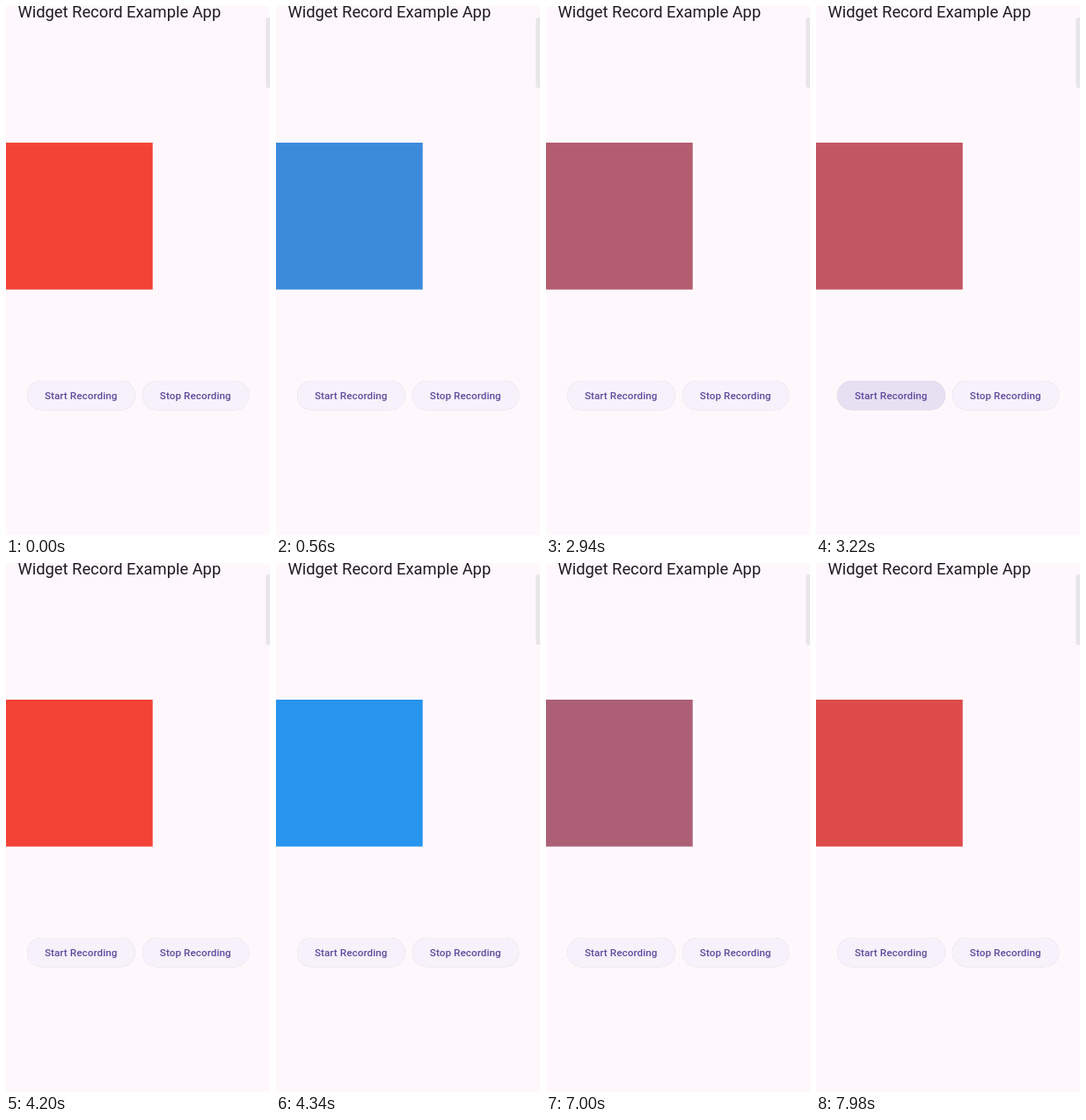
These frames come from a looping animation (300 px wide and 600 px high, 8000 ms). An HTML page:

```html
<!DOCTYPE html>
<html lang="en">
<head>
<meta charset="utf-8">
<title>Widget recorder</title>
<style>
  html, body { margin: 0; width: 100%; height: 100%; overflow: hidden; background: #fef8fd; }
  svg { display: block; width: 100vw; height: 100vh; }
  text { font-family: Roboto, sans-serif; }
  .title { font-size: 18.33px; fill: #1d1b20; }
  .label { font-size: 11.67px; font-weight: 500; letter-spacing: .083px; fill: #5f4b9f; }
  .button { filter: drop-shadow(0 .8px .7px rgba(0, 0, 0, .25)); }
</style>
</head>
<body>
<svg viewBox="0 0 300 600">
  <rect width="300" height="600" fill="#fef8fd"/>
  <text class="title" x="13.5" y="12.7">Widget Record Example App</text>
  <rect x="295.3" y="13" width="10" height="80" rx="3" fill="#e9e6e9"/>
  <rect id="box" y="155" width="166.7" height="166.6"/>
  <rect id="start" class="button" x="24" y="425" width="123" height="33.3" rx="16.65"/>
  <text class="label" x="43.9" y="445.8">Start Recording</text>
  <rect class="button" x="154.8" y="425" width="121.5" height="33.3" rx="16.65" fill="#f6f1fa"/>
  <text class="label" x="174.8" y="445.8">Stop Recording</text>
</svg>
<script>
  const LOOP = 8000, STEP = 140, FADE = 4200, RESET = 20;
  const RED = [244, 67, 54], BLUE = [33, 150, 243];
  const IDLE = [246, 241, 250], PRESSED = [231, 224, 242];
  const box = document.getElementById('box');
  const start = document.getElementById('start');

  const mix = (a, b, k) => `rgb(${a.map((v, i) => Math.round(v + (b[i] - v) * k))})`;

  // Blue fades to red, then jumps back to blue.
  const blueness = t => ((RESET - t) % FADE + FADE) % FADE / FADE;

  function pressure(t) {
    if (t < 3080 || t >= 3360) return 0;
    return t < 3220 ? 0.5 : 1;
  }

  function draw(now) {
    const t = Math.floor(now % LOOP / STEP) * STEP;
    box.setAttribute('fill', mix(RED, BLUE, blueness(t)));
    start.setAttribute('fill', mix(IDLE, PRESSED, pressure(t)));
  }

  let origin;
  function tick(now) {
    origin ??= now;
    draw(now - origin);
    requestAnimationFrame(tick);
  }
  draw(0);
  requestAnimationFrame(tick);
</script>
</body>
</html>
```
